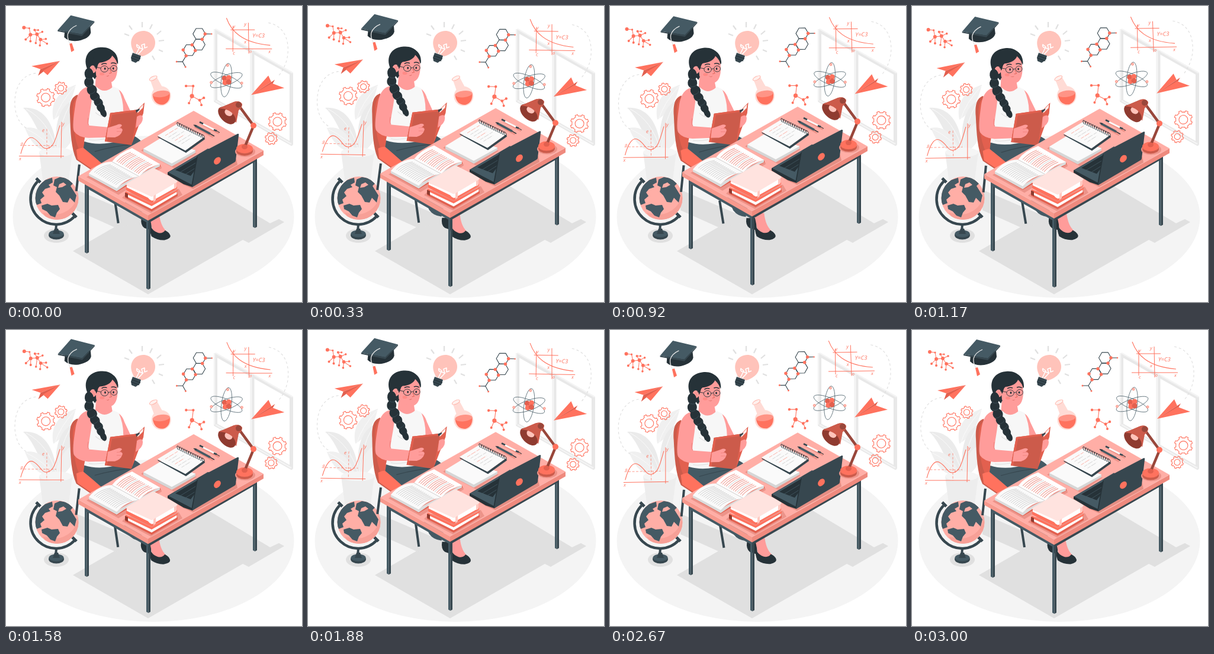
Animation, 500 px wide and 500 px high, one loop 3.04 s. Source, as an HTML page with a canvas:

```html
<!DOCTYPE html>
<html lang="en">
<head>
<meta charset="utf-8">
<title>Study desk</title>
<style>
html, body { margin: 0; width: 100%; height: 100%; overflow: hidden; background: #fff; }
canvas { display: block; width: 500px; height: 500px; }
</style>
</head>
<body>
<canvas id="stage"></canvas>
<script>
const LOOP = 3040, SWAY = 1520, STEP = 1000 / 24;
const CORAL = '#ff725e', DEEP = '#cc5b4b', BRICK = '#99473b', RED = '#e2604f', PINK = '#ffaea6', PALE = '#ffe3df';
const SKIN = '#ff9c9a', FOLD = '#ee7f7b', SHADE = '#ec9389';
const INK = '#263238', SLATE = '#37474f', STEEL = '#455a64', GREY = '#e0e0e0';
const canvas = document.getElementById('stage');
const g = canvas.getContext('2d');
const dpr = window.devicePixelRatio || 1;
canvas.width = canvas.height = 500 * dpr;

const fill = (c, d) => { g.fillStyle = c; g.fill(new Path2D(d)); };
const line = (c, w, d) => { g.strokeStyle = c; g.lineWidth = w; g.stroke(new Path2D(d)); };
function oval(c, x, y, rx, ry = rx, rot = 0) {
  g.beginPath(); g.ellipse(x, y, rx, ry, rot, 0, 7); g.fillStyle = c; g.fill();
}
function ring(c, w, x, y, rx, ry = rx, rot = 0) {
  g.beginPath(); g.ellipse(x, y, rx, ry, rot, 0, 7); g.strokeStyle = c; g.lineWidth = w; g.stroke();
}
function label(s, x, y, size = 8) {
  g.font = `italic ${size}px "Open Sans", sans-serif`; g.fillStyle = CORAL; g.fillText(s, x, y);
}
function dashed(c, w, gap, d) { g.setLineDash(gap); line(c, w, d); g.setLineDash([]); }

function room() {
  oval('#f4f4f4', 249, 356, 237.5, 137);
  fill(GREY, 'M113 414L322 293L446 367L461 360L470 365L410 400L400 395L240 487Z');
  fill(GREY, 'M118 310L240 362L186 375L119 345Z');
  // window
  line('#e8e8e8', 6, 'M354 42V160L482 233V114Z');
  line('#f4f4f4', 2.5, 'M352 39V160M354 39L484 113M354 160L482 233');
  line('#e8e8e8', 7, 'M416 76V195');
  line('#f4f4f4', 3, 'M414 76V194');
  plant();
  globe();
}

function plant() {
  const c = '#f0f0f0', dim = '#ebebeb', vein = '#fafafa';
  fill(c, 'M118 133C88 143 74 165 80 192C100 180 112 160 118 133Z');
  fill(dim, 'M29 172C58 170 82 190 86 246C58 236 52 192 29 172Z');
  fill(c, 'M32 206C55 201 72 218 82 248C55 246 42 232 32 206Z');
  fill(dim, 'M111 160C90 172 80 200 86 246C106 222 114 196 111 160Z');
  fill(c, 'M120 192C99 198 86 220 86 249C106 242 118 222 120 192Z');
  line(vein, 1, 'M117 135Q90 165 82 192M34 174Q72 194 85 244M35 208Q65 222 82 247M110 163Q88 202 86 244');
  fill('#ededed', 'M56 247Q84 261 112 247L106 293Q84 307 62 293Z');
  oval('#f5f5f5', 84, 247, 28, 8);
}

function globe() {
  oval(GREY, 85, 388, 21, 12);
  g.beginPath(); g.arc(84.5, 326, 43, 0.75, 3.9);
  g.strokeStyle = SLATE; g.lineWidth = 4.5; g.stroke();
  line(SLATE, 5, 'M51 291L58 298M112 350L119 357');
  g.save();
  g.beginPath(); g.arc(86, 324.5, 36.5, 0, 7); g.clip();
  fill(PINK, 'M45 285H125V365H45Z');
  fill('#f7a097', 'M122 312Q119 348 82 353L62 349L72 364H125Z');
  fill(STEEL, 'M82 293L91 289L104 291L113 300L109 304L114 312L119 320L116 332L108 324L104 332L96 331L90 320L84 314L86 306L80 303Z');
  fill(PINK, 'M90 301L97 298L102 302L95 306L88 307Z');
  fill(STEEL, 'M66 294L78 290L79 298L72 302L75 306L66 309L61 315L65 321L58 327L60 333L52 336L46 324L53 305Z');
  fill(STEEL, 'M60 337L70 334L77 337L88 336L91 343L86 349L83 357L75 354L69 347L61 343Z');
  g.restore();
  line(SLATE, 4, 'M85 368L84 382');
  oval(SLATE, 85, 387, 13, 7.5);
  oval(STEEL, 85, 384.5, 12.5, 6);
  fill(SLATE, 'M82 376H88L91 385H79Z');
}

function bulb() {
  line(GREY, 2.2, 'M230 27V36M247 31L243 39M262 42L255 48M258 59L267 58M258 74L265 77M208 33L213 40M200 47L208 50M247 84L251 91');
  fill('#ffc3ba', 'M213 72C207 56 217 42 232 42C244 42 252 52 252 62C252 75 240 82 230 85L216 79Z');
  line('#fff', 1.6, 'M220 81L226 69L221 65Q219 70 226 71L231 73L229 66L234 64L234 71L239 69M222 83L232 72');
  fill(SLATE, 'M214 79L228 84L226 91L219 96L212 93L211 87Z');
  line(INK, 1.3, 'M213 84L227 89M212 88L225 93');
}

function gear(x, y, r, turn = 0) {
  const n = 8, w = Math.PI * 2 / n;
  g.beginPath();
  for (let i = 0; i < n; i++) {
    [[0, .83], [.15, .83], [.22, 1], [.57, 1], [.64, .83]].forEach(([a, k]) => {
      const q = (i + a) * w + turn;
      g.lineTo(x + Math.cos(q) * r * k, y + Math.sin(q) * r * k);
    });
  }
  g.closePath(); g.strokeStyle = CORAL; g.lineWidth = 1.1; g.stroke();
  ring(CORAL, 1.1, x, y, r * .48);
}

function hexagon(x, y, r) {
  g.beginPath();
  for (let i = 0; i < 6; i++) g.lineTo(x + r * Math.cos(i * Math.PI / 3), y + r * Math.sin(i * Math.PI / 3));
  g.closePath(); g.strokeStyle = SLATE; g.lineWidth = 1.1; g.stroke();
}

function icons() {
  // flight trails
  dashed('#dedede', 1.1, [4, 4], 'M50 114C24 117 13 142 15 170C17 190 26 204 38 208');
  dashed('#dedede', 1.1, [4, 4], 'M443 28C469 33 477 55 476 77Q475 99 460 118');

  // molecules
  line(CORAL, 1, 'M30 37L39 38L41 49L52 48L61 44M52 48L48 41L54 41M52 48L58 57L69 64M58 57L67 56M58 57L57 67M41 49L33 57M41 49L41 60M52 48L50 63');
  [[30, 37, 3], [39, 38, 1.6], [41, 49, 3], [52, 48, 3], [61, 44, 1.8], [48, 41, 2], [54, 41, 1.6], [58, 57, 2.8],
   [69, 64, 1.8], [67, 56, 1.8], [57, 67, 1.8], [33, 57, 2], [41, 60, 2], [50, 63, 1.8]].forEach(p => oval(CORAL, ...p));
  line(CORAL, 1.1, 'M304 135L316 135L314 152L327 159L334 155M327 159L330 166M314 152L309 164');
  [[304, 135, 2.2], [316, 135, 2.2], [314, 152, 3.6], [327, 159, 2.4], [334, 155, 2.2], [330, 167, 2], [309, 164, 2]].forEach(p => oval(CORAL, ...p));
  hexagon(326, 47, 10.5); hexagon(325.5, 65, 10.5); hexagon(309.5, 74.5, 10.5);
  line(SLATE, 1.1, 'M336 47L347 47M304 84L298 94L288 94M298 94L303 103');
  [[336, 47, 2.7], [331, 56, 2.7], [319.5, 75, 2.7], [314, 65.5, 2.7], [299, 74, 2.7], [304, 84, 2.7], [288, 94, 1.5], [303, 103, 1.5], [347, 47, 1.2]].forEach(p => oval(CORAL, ...p));

  // mortarboard
  fill(INK, 'M99 41L98 53Q106 61 122 59Q141 55 143 45L142 35Z');
  fill(STEEL, 'M109 16L149 26L128 48L87 41Z');
  fill(SLATE, 'M87 41L128 48L149 26V28L128 51L87 43Z');
  line('#e8e8e8', 1.3, 'M119 33Q107 38 104 48Q103 56 108 64');
  fill(CORAL, 'M107 64L111 63L115 75L110 78Z');

  // paper planes
  fill(CORAL, 'M43 102L91 93L58 107Z');
  fill(RED, 'M91 93L58 107L54 118L63 111Z');
  fill(CORAL, 'M91 93L62 110L70 117Z');
  fill(CORAL, 'M414 150L443 117L448 128Z');
  fill(RED, 'M414 150L448 128L454 124L449 133Z');
  fill(CORAL, 'M414 150L449 130L470 138Z');

  gear(67, 155, 15.5); gear(92.5, 139, 10.5, .2);
  gear(458.5, 195, 15.5, .1); gear(448, 223.5, 10.5);

  // wave graph
  line(CORAL, 1, 'M94 196L93 257M22 254H98');
  line(CORAL, 1.1, 'M25 250C31 228 39 219 47 224C58 230 60 242 69 241C81 240 84 224 91 202');
  dashed(CORAL, .7, [4, 2.5], 'M69 208V254M24 236H85');
  label('e', 61, 213); label('y', 95, 202); label('x', 22, 261); label('a', 25, 235, 7); label('x', 71, 241, 7);

  // decay graph
  line(CORAL, 1, 'M383 34V77M409 28L410 80M371 72H449M379 40H420');
  line(CORAL, 1.1, 'M372 20C380 42 398 62 446 66');
  label('v', 383, 37); label('y', 402, 33); label('Y=C3', 416, 53, 9.5); label('x', 402, 63); label('x', 443, 79); label('o', 411, 79, 7); label('c', 383, 82);

  // atom
  [.4, 1.7, 2.78].forEach(a => ring(STEEL, .8, 372, 125, 28.5, 8.5, a));
  [[369, 122], [376, 121], [370, 129], [376, 128]].forEach(([x, y], i) => oval(i % 3 ? CORAL : RED, x, y, 4.5));
  [[346.5, 129], [374, 100], [398, 130]].forEach(([x, y]) => { oval('#ffc3ba', x, y, 2); ring(CORAL, .7, x, y, 2); });

  // flask
  oval('#ffdbd5', 262, 152, 16.5);
  fill('#ffdbd5', 'M243 124L254 119L264 137L250 143Z');
  fill(CORAL, 'M247.5 150L276.5 147Q278 162 266 166.5Q250 168 247.5 150Z');
  oval('#ff9486', 262, 148.5, 14.5, 5.5, -.12);
  oval('#fff0ed', 248.5, 122, 7, 3, -.45);
  ring('#ffb5aa', 1, 248.5, 122, 7, 3, -.45);
}

function chair() {
  line(SLATE, 4, 'M124 268L119 313M184 328L190 367');
  fill(DEEP, 'M121 150C110 154 107 164 108 184C109 214 110 240 119 260L160 288L170 265L136 240Z');
  fill(RED, 'M124 152C114 157 112 168 113 186Q115 226 124 244L150 262L146 230L140 155Z');
  fill(CORAL, 'M119 243Q128 238 140 240L180 266L160 286L121 259Z');
}

function woman() {
  // lower legs
  fill(STEEL, 'M196 320L232 338L228 356Q214 355 207 345Z');
  fill(INK, 'M229 358Q227 370 234 375L246 379L246 358Z');
  fill(SKIN, 'M242 350H259Q261 371 271 380Q262 388 248 381Z');
  fill(INK, 'M244 371Q242 378 246 389Q256 396 268 395.5Q279 393 278 388Q276 382 269 379Q265 385 257 383Q248 380 244 371Z');
  // thighs
  fill(STEEL, 'M133 226C148 214 190 220 212 218Q228 223 236 240L200 276L164 268Q146 252 131 240Z');
  line(SLATE, 1.2, 'M150 246Q185 236 213 234');

  // far arm and torso
  fill(SKIN, 'M182 138Q195 140 200 156L210 177L198 187L180 160Z');
  fill(SKIN, 'M152 116L177 124L180 141L170 151L150 142Z');
  fill('#f7f7f7', 'M142 137L153 137Q166 150 181 136L190 140Q198 158 198 176L197 226Q160 238 132 229Q140 190 136 160Z');
  line('#dedede', 1, 'M151 180Q162 190 170 185M140 226Q150 228 166 225');
  // near arm
  fill(SKIN, 'M144 136C127 137 120 148 117 168C114 188 112 205 115 212Q122 222 139 223L178 222L186 206L139 202C140 182 148 158 144 136Z');
  line(FOLD, 1, 'M140 202Q137 198 139 189');

  // book
  fill(RED, 'M220 177L234 163L232 181L212 235Z');
  fill('#fff1ee', 'M222 176L232 166L231 172L221 182Z');
  fill(SKIN, 'M221 187Q231 181 231 190Q231 199 219 206Z');
  fill(DEEP, 'M176 181L223 175L212 235L167 229Z');
  fill(RED, 'M176 181L223 175L222 178L179 184L171 229L167 229Z');
  fill(SLATE, 'M219 176L226 173L225 176L220 180Z');
  // hand
  fill(SKIN, 'M172 206L187 201Q194 198 196 202L192 206Q199 207 196 212Q194 219 184 222L170 222Z');
  line(FOLD, .8, 'M187 207L195 206M187 212L195 212');

  head();
}

function head() {
  fill(INK, 'M140 112C128 93 135 72 159 70C178 68 190 82 188 98L160 106L150 124Z');
  fill(SKIN, 'M150 96C160 94 173 88 179 83Q188 90 188 104Q188 125 177 129Q162 130 152 118Z');
  oval(SKIN, 146.5, 107, 5.5, 6.5);
  line(FOLD, .9, 'M145 105Q149 105 148 110');
  fill(INK, 'M145 99C150 101 151 104 152 108C155 104 154 98 158 96C169 95 177 90 179 84Q184 88 189 98Q190 77 171 72L150 75Z');
  // face
  line(INK, 1.5, 'M161 99Q165 96 170 98M177 97Q182 95 186 98');
  ring(INK, .9, 166, 106.5, 6.2, 5.3); ring(INK, .9, 182, 105.5, 5.4, 5);
  line(INK, .9, 'M172 106L176 105M160 105L149 103');
  oval(INK, 167, 106, 1.4, 2); oval(INK, 181, 105.5, 1.4, 2);
  line('#d85d50', .9, 'M175 107L178 113L174 114');
  fill('#c74e43', 'M167 117Q171 120 174 117Q172 121 167 117Z');
  oval('#ff8b86', 162, 115, 4, 2.5);
  // braid
  line(INK, 9, 'M139 112L141 130L147 145L157 163L165 183');
  [[140, 115, 7.5, 10, -.1], [140, 129, 8, 9, .1], [145, 142, 8.5, 9, -.5], [150, 153, 8.8, 7.5, .6],
   [156, 163, 8.2, 7, .7], [160, 172, 7.5, 6.5, .9], [165, 181, 4.6, 7, -.35]].forEach(p => oval(INK, ...p));
  line(STEEL, .6, 'M134 120Q140 126 146 122M135 134Q142 138 147 132M140 149Q148 149 151 143M146 159Q154 158 157 152M152 168Q160 166 162 160');
}

function desk() {
  // legs and rails
  const leg = (x, y, h) => {
    fill(STEEL, `M${x} ${y}h3.5v${h + 2}l-3.5 -2Z`);
    fill(SLATE, `M${x + 3.5} ${y}h3.5v${h}l-3.5 2Z`);
  };
  leg(133, 298, 118); leg(417, 254, 119);
  fill(STEEL, 'M133 299L240 360V367L133 306Z');
  fill(SLATE, 'M424 254V261L240 367V360Z');
  leg(237, 360, 117);
  // top
  fill('#f7998d', 'M122 287.5L240 353.5V362.5L122 295Z');
  fill('#ef8a7e', 'M240 353.5L435 244V252L240 362.5Z');
  fill(PINK, 'M317 177L435 244L240 353.5L122 287.5Z');
  papers(); openBook(); closedBooks(); laptop(); lamp();
}

function papers() {
  fill(SHADE, 'M228 244L262 223L322 249L284 274Z');
  fill('#d6d6d6', 'M232 241V246L280 271L320 248V243Z');
  fill('#fafafa', 'M263 222L320 244L280 266L232 241Z');
  fill(SLATE, 'M256 220L257 222L304 248L336 225L335 221L303 244Z');
  fill('#fafafa', 'M289 199L335 221L303 244L256 219Z');
  for (let i = 0; i < 12; i++) {
    const x = 291 + i * 3.8, y = 200 + i * 1.85;
    g.beginPath(); g.ellipse(x, y, 1.7, 3.6, -.4, 1.9, 6.9); g.strokeStyle = INK; g.lineWidth = 1; g.stroke();
  }
  for (let i = 0; i < 6; i++) {
    const x = 269 + i * 5.5, y = 219 + i * 2.8;
    dashed(i % 3 ? '#c4c4c4' : '#ff9486', .7, [6, 1.5, 9, 2], `M${x} ${y}l${21 - i % 2 * 5} ${-13 + i % 2 * 3}`);
  }
  line(SHADE, 4, 'M319 204L350 221M330 199L360 215');
  line(STEEL, 3.6, 'M319 202L345 216');
  line(INK, 1.4, 'M345 216L352 220M317 201L322 203');
  line('#fafafa', 2.8, 'M330 198L354 210');
  line(SLATE, 2.8, 'M327 196L333 199M351 209L356 211');
  line(INK, 1, 'M356 211L361 214');
}

function openBook() {
  fill(SHADE, 'M136 289L144 284L262 270L263 274L190 319Z');
  fill(RED, 'M139 287L187 314L261 271V268L187 311Z');
  fill('#dcdcdc', 'M140 282V287L187 313L222 289L260 271V266L187 306Z');
  fill('#fafafa', 'M140 283C150 270 164 263 179 263L225 288Q204 290 187 308Z');
  fill('#fff', 'M179 263Q190 248 213 240L260 267Q238 272 225 288Z');
  line('#d0d0d0', 1, 'M179 263L225 288');
  for (let i = 0; i < 13; i++) {
    const x = 149 + i * 3, y = 281 + i * 1.75;
    line('#c4c4c4', .8, `M${x} ${y}q12 -11 28 -13`);
  }
  for (let i = 0; i < 13; i++) {
    const x = 187 + i * 3, y = 263 + i * 1.7;
    line(i % 5 === 4 ? '#dadada' : '#f0a198', 1.1, `M${x} ${y}q10 -11 24 -16`);
  }
}

function closedBooks() {
  fill(SHADE, 'M196 324L204 316L292 309L298 319L245 350Z');
  // lower book
  fill(RED, 'M201 321L246 343L290 317V321L246 347L201 324Z');
  fill('#fff', 'M205 315L246 335L288 311V318L246 343L205 322Z');
  fill(CORAL, 'M202 313L246 334L290 310V313L246 338L202 317Z');
  fill('#8f3b30', 'M201 315L206 317V325L201 322Z');
  // upper book
  fill(CORAL, 'M203 308L246 329L289 305V308L246 333L203 311Z');
  fill('#fff', 'M204 303L247 321L288 297V306L247 329L204 309Z');
  fill(CORAL, 'M203 306L240 324L247 332L240 330L203 311Z');
  fill(PALE, 'M246 275Q249 273 252 275L289 294Q291 296 288 298L249 321Q246 323 243 321L204 303Q202 301 205 299Z');
  fill('#ffc9c1', 'M249 321L253 318V328L249 331ZM284 300L288 298V307L284 309Z');
}

function laptop() {
  fill('#e58e83', 'M272 284L300 302L316 309L391 268L389 258Z');
  fill(INK, 'M273 281L341 241L356 247L315 306L300 301L273 285Z');
  fill(STEEL, 'M274 281L341 241L350 246L314 302Z');
  fill(INK, 'M286 277L323 255L333 259L312 287Z');
  line(STEEL, .8, 'M294 281L327 261M302 285L329 268');
  fill(SLATE, 'M323 254Q323 252 326 250L391 216Q394 215 393 219L388 261Q388 263 386 264L318 304Q314 307 314 303Z');
  line(INK, 1.6, 'M323 254L314 304');
  oval(CORAL, 357, 261.5, 5, 7, .7);
}

function lamp() {
  oval(SHADE, 404, 246, 17, 9);
  oval(DEEP, 403, 245, 14, 8);
  oval(CORAL, 403, 241, 14, 8);
  line(BRICK, 4.5, 'M403 239L418 203M418 202L393 168');
  oval(RED, 403, 238, 5, 4);
  oval(CORAL, 418, 202, 5);
  fill(DEEP, 'M359 173L385 162Q395 159 399 166Q399 172 393 176L389 197Z');
  oval('#8f3b30', 373, 185, 18, 10.5, .78);
  oval('#ffc3ba', 376, 180, 7, 5.5, .6);
  fill(DEEP, 'M359 173L385 162Q395 159 399 166Q396 174 390 174L388 190Q381 173 359 173Z');
  oval(BRICK, 393, 167, 5);
}

// one sway: 0 -> 1 -> -1 -> 0 in straight segments
const tilt = p => p < .25 ? p * 4 : p < .75 ? 2 - p * 4 : p * 4 - 4;
const lift = p => 10 * (1 - Math.abs(1 - 2 * p));

function draw(ms) {
  const frame = Math.floor((ms % LOOP + 5) / STEP);
  const p = (frame + 1) * STEP % SWAY / SWAY;
  g.setTransform(dpr, 0, 0, dpr, 0, 0);
  g.fillStyle = '#fff';
  g.fillRect(0, 0, 500, 500);
  g.lineJoin = 'round';
  room();
  bulb();
  g.save();
  g.translate(245.5, 205);
  g.rotate(tilt(p) * Math.PI / 180);
  g.translate(-245.5, -205);
  icons(); chair(); woman();
  g.restore();
  g.save();
  g.translate(0, .5 - lift(p));
  desk();
  g.restore();
}

const start = performance.now();
function tick() {
  draw(performance.now() - start);
  requestAnimationFrame(tick);
}
tick();
</script>
</body>
</html>
```
